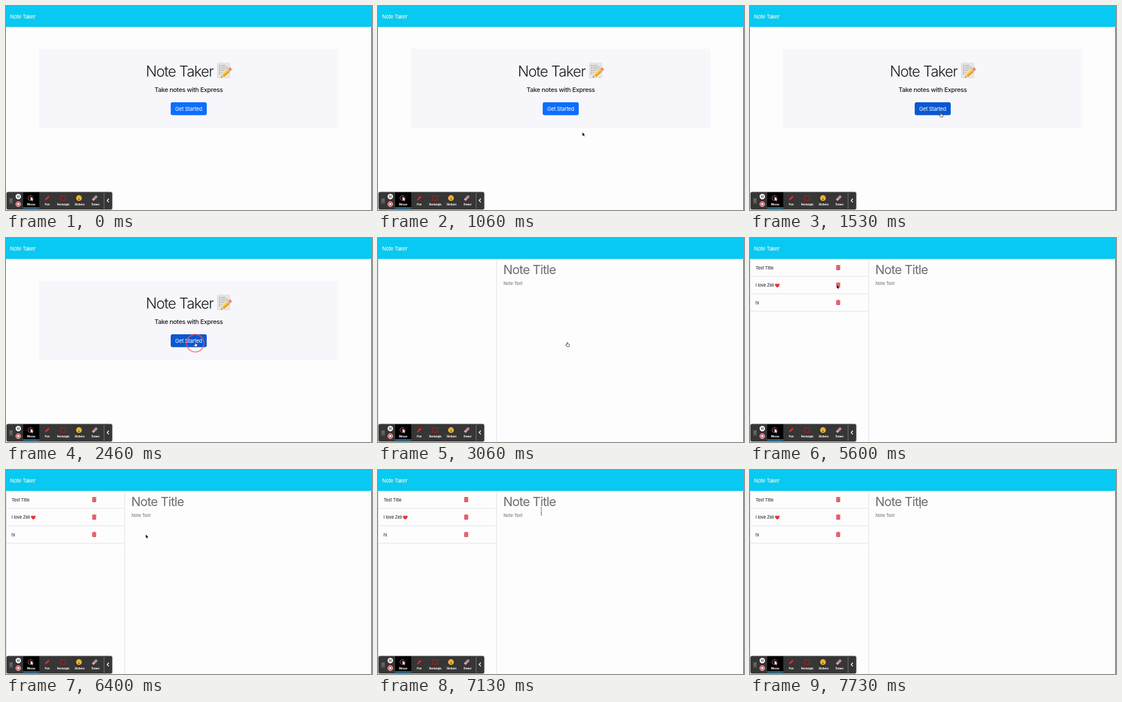
These frames come from a looping animation (640 by 356 pixels, 8000 ms). An HTML page:

```html
<!DOCTYPE html>
<html lang="en">
<head>
<meta charset="utf-8">
<title>Note Taker</title>
<style>
  html, body { margin: 0; width: 100%; height: 100%; overflow: hidden; background: #fdfdfd; }
  svg { display: block; width: 100vw; height: 100vh; }
  text { font-family: Inter, Roboto, sans-serif; fill: #1b1d20; }
  .mid { text-anchor: middle; }
  .nav { font-size: 9.2px; letter-spacing: -.037em; fill: #fff; }
  .hero { font-size: 25.6px; font-weight: 300; letter-spacing: -.045em; }
  .lead { font-size: 11px; font-weight: 500; letter-spacing: -.031em; }
  .btn { font-size: 9.3px; letter-spacing: -.028em; fill: #fff; }
  .title { font-size: 22px; letter-spacing: -.04em; fill: #6e6e6e; }
  .body { font-size: 7.5px; letter-spacing: -.015em; fill: #6a6a6a; }
  .item { font-size: 7.5px; letter-spacing: -.015em; fill: #101214; }
  .tool { font-size: 4.7px; font-weight: 700; letter-spacing: -.04em; fill: #fff; text-anchor: middle; }
  .line { stroke: #e0e1e3; stroke-width: 1; fill: none; }
  .panel { fill: #363636; filter: drop-shadow(0 0 1px rgba(0, 0, 0, .55)); }
</style>
</head>
<body>
<svg viewBox="0 0 640 356" preserveAspectRatio="none">
  <defs>
    <g id="bin">
      <path d="M-3.9-3.7H-1.5L-1-4.4H1L1.5-3.7H3.9V-2.6H-3.9ZM-3.3-2.1H3.3V3.5Q3.3 4.4 2.4 4.4H-2.4Q-3.3 4.4-3.3 3.5Z" fill="#dc3545"/>
      <path d="M-1.6-.9V3.2M0-.9V3.2M1.6-.9V3.2" stroke="#f6c6cb" stroke-width=".6"/>
    </g>
    <path id="arrow" d="M0 0V6.2L1.5 4.9 2.5 7.1 3.5 6.6 2.5 4.5H4.4Z"/>
  </defs>

  <rect width="640" height="356" fill="#fdfdfd"/>
  <rect width="640" height="36.6" fill="#08c9f1"/>
  <text class="nav" x="7.3" y="22">Note Taker</text>

  <g id="home">
    <rect x="57.5" y="74.5" width="523.5" height="138.5" fill="#f7f7fb"/>
    <text class="hero" x="244.5" y="122.5">Note Taker</text>
    <g id="memo">
      <rect x="369.5" y="99.5" width="22" height="26" rx=".8" fill="#e6e6e4" stroke="#d2d2d0" stroke-width=".6"/>
      <path d="M372 103.5H384M372 106.5H389M372 109.5H387M372 112.5H383M372 115.5H379M372 118.5H376" stroke="#8f8f8d" stroke-width=".9" stroke-dasharray="3.2 .7 1.8 .6"/>
      <g transform="translate(375.6 124.6) rotate(-41)">
        <path d="M0 0 5-2.9V2.9Z" fill="#eecb9b"/>
        <path d="M0 0 1.9-1.1V1.1Z" fill="#333"/>
        <path d="M5-2.9H18V2.9H5Z" fill="#f8b92c"/>
        <path d="M5-2.9H18V-1H5Z" fill="#fdd75c"/>
        <path d="M5 1.2H18V2.9H5Z" fill="#e0901a"/>
        <path d="M18-2.9H20.2V2.9H18Z" fill="#b9bcc0"/>
        <path d="M20.2-2.9H21.4A2.9 2.9 0 0 1 21.4 2.9H20.2Z" fill="#ee8277"/>
      </g>
    </g>
    <text class="lead mid" x="319.5" y="150.4">Take notes with Express</text>
    <rect id="start" x="288" y="168" width="63" height="22.4" rx="3.2"/>
    <text class="btn mid" x="319.4" y="183">Get Started</text>
  </g>

  <g id="notes">
    <path class="line" d="M.5 37V356M207.5 37V356"/>
    <text class="title" x="219" y="63.3">Note Title</text>
    <text class="body" x="219.5" y="81.6">Note Text</text>
    <g id="list">
      <path class="line" d="M0 67H207M0 97.3H207M0 127.7H207"/>
      <text class="item" x="9.7" y="54.7">Test Title</text>
      <text class="item" x="9.7" y="85.2">I love Zeli</text>
      <path transform="translate(47.8 82.8)" d="M0 3.6C-6-.2-4-3.6-2-3.4-.8-3.3-.2-2.6 0-1.9 .2-2.6 .8-3.3 2-3.4 4-3.6 6-.2 0 3.6Z" fill="#e8343a"/>
      <text class="item" x="9.7" y="115.7">hi</text>
      <use href="#bin" x="154.2" y="51.5"/>
      <use href="#bin" x="154.2" y="82"/>
      <use href="#bin" x="154.2" y="112.4"/>
    </g>
  </g>
  <path d="M639.5 37V356" stroke="#3c4043"/>

  <g id="toolbar">
    <rect class="panel" x="1" y="324.8" width="184.6" height="30.2" rx="2.5"/>
    <path d="M7.4 336V344.5M10.4 336V344.5" stroke="#bbb" stroke-width="1.4" stroke-dasharray="1.4 .9"/>
    <circle cx="21.5" cy="332.6" r="4.8" fill="#f4f4f4"/>
    <path d="M20.2 330.6V334.6M22.8 330.6V334.6" stroke="#333" stroke-width="1.2"/>
    <circle cx="21.5" cy="345.8" r="4.2" fill="#e5383f" stroke="#f4f4f4" stroke-width="1"/>
    <rect x="19.7" y="344" width="3.6" height="3.6" rx=".5" fill="#fff"/>
    <rect x="30" y="325" width="28.2" height="28" fill="#000"/>
    <rect x="30" y="351.6" width="28.2" height="1.6" fill="#1ba0e8"/>
    <circle cx="42.8" cy="335" r="4.3" fill="none" stroke="#c9605c" stroke-width="1"/>
    <use href="#arrow" transform="translate(43 332.6) scale(1.15)" fill="#fff"/>
    <g transform="translate(72 335.2) rotate(-45) scale(.88)">
      <path d="M-6 0-3-1.8H4.6Q5.8 0 4.6 1.8H-3Z" fill="#e02a30"/>
      <path d="M-2.8-1.8V1.8M2.2-1.8V1.8" stroke="#8e1519" stroke-width=".7"/>
    </g>
    <rect x="95.8" y="331" width="8.4" height="8" fill="none" stroke="#bd141a" stroke-width="1.2"/>
    <circle cx="127.6" cy="335.2" r="4.9" fill="#f5bd3a"/>
    <path d="M125.2 336.4Q127.6 340 130 336.4Z" fill="#71401a"/>
    <path d="M125.8 333.2V334.6M129.4 333.2V334.6" stroke="#71401a" stroke-width="1.1"/>
    <g transform="translate(155.2 335.2) rotate(-45)">
      <rect x="-5.2" y="-2.1" width="10.4" height="4.2" rx="1" fill="#e6a0b2"/>
      <path d="M-1.8-2.1H4.2Q5.2-2.1 5.2-1.1V1.1Q5.2 2.1 4.2 2.1H-1.8Z" fill="#b58a98"/>
    </g>
    <text class="tool" x="44" y="347.6">Mouse</text>
    <text class="tool" x="72.2" y="347.6">Pen</text>
    <text class="tool" x="100.2" y="347.6">Rectangle</text>
    <text class="tool" x="128.6" y="347.6">Stickers</text>
    <text class="tool" x="156.6" y="347.6">Eraser</text>
    <path d="M171.5 326V354" stroke="#777"/>
    <path d="M179.8 336.2 176.9 339.3 179.8 342.4" fill="none" stroke="#fff" stroke-width="1.4"/>
  </g>

  <circle id="ring" fill="none" stroke="#f0565f" stroke-width="1.8"/>
  <g id="cursor">
    <use id="pointer" href="#arrow" fill="#111" stroke="#fff" stroke-width=".6" paint-order="stroke"/>
    <path id="hand" d="M-.8 4.6V.6Q0-.4 .8 .6V2.7L3.2 3.3Q3.9 3.6 3.8 4.6L3.2 7.6H-.8L-2.8 4.9Q-2.6 3.8-1.6 4.4Z" fill="#fff" stroke="#222" stroke-width=".8" stroke-linejoin="round"/>
    <path id="beam" d="M-1.5-6.6Q0-6.6 0-5.4 0-6.6 1.5-6.6M0-5.4V5.4M-1.5 6.6Q0 6.6 0 5.4 0 6.6 1.5 6.6M-1 2.2H1" fill="none" stroke="#555" stroke-width=".8"/>
  </g>
</svg>
<script>
const LOOP = 8000, STEP = 1000 / 15;
const OPEN = 3000, LOADED = 3130, CLICK = 2460, CLICK_END = 2800;

// Pointer stops: time, x, y
const stops = [
  [0, 424, 354], [530, 358.3, 221.6], [1000, 358.3, 221.6],
  [1667, 331, 182], [3400, 331, 182], [3800, 320, 164],
  [4067, 320, 164], [4330, 222, 58], [5200, 222, 58],
  [5600, 152, 82], [6067, 196, 116], [6400, 244.5, 112.5],
  [6540, 244.5, 112.5], [7400, 297.8, 60]
];

const $ = id => document.getElementById(id);
const show = (id, on) => $(id).setAttribute("display", on ? "inline" : "none");
const ease = p => p * p * (3 - 2 * p);
const inside = ([x, y], l, t, r, b) => x >= l && x <= r && y >= t && y <= b;

function pointerAt(t) {
  const i = stops.findIndex(s => s[0] > t);
  if (i < 0) return stops[stops.length - 1].slice(1);
  const [t0, x0, y0] = stops[i - 1], [t1, x1, y1] = stops[i];
  const p = ease((t - t0) / (t1 - t0));
  return [x0 + (x1 - x0) * p, y0 + (y1 - y0) * p];
}

function shapeAt(t, pos) {
  if (t < OPEN) return inside(pos, 288, 168, 351, 190.5) ? "hand" : "pointer";
  if (t < 3200) return "hand";
  return inside(pos, 214, 42, 632, 86) ? "beam" : "pointer";
}

function render(now) {
  const t = Math.floor((now % LOOP + 7) / STEP) * STEP % LOOP;
  const pos = pointerAt(t), shape = shapeAt(t, pos);

  show("home", t < OPEN);
  show("notes", t >= OPEN);
  show("list", t >= LOADED);

  show("cursor", t >= 60);
  $("cursor").setAttribute("transform", `translate(${pos})`);
  for (const id of ["pointer", "hand", "beam"]) show(id, id === shape);
  $("start").setAttribute("fill", shape === "hand" ? "#0b57d0" : "#0d6efd");

  const p = (t - CLICK) / (CLICK_END - CLICK);
  show("ring", p >= 0 && p < 1);
  if (p >= 0 && p < 1) {
    const ring = { cx: 331, cy: 183.6, r: 15.3 + 2 * p, opacity: .75 * (1 - p) };
    for (const k in ring) $("ring").setAttribute(k, ring[k]);
  }
}

const began = performance.now();
function tick() {
  render(performance.now() - began);
  requestAnimationFrame(tick);
}
tick();
</script>
</body>
</html>
```
